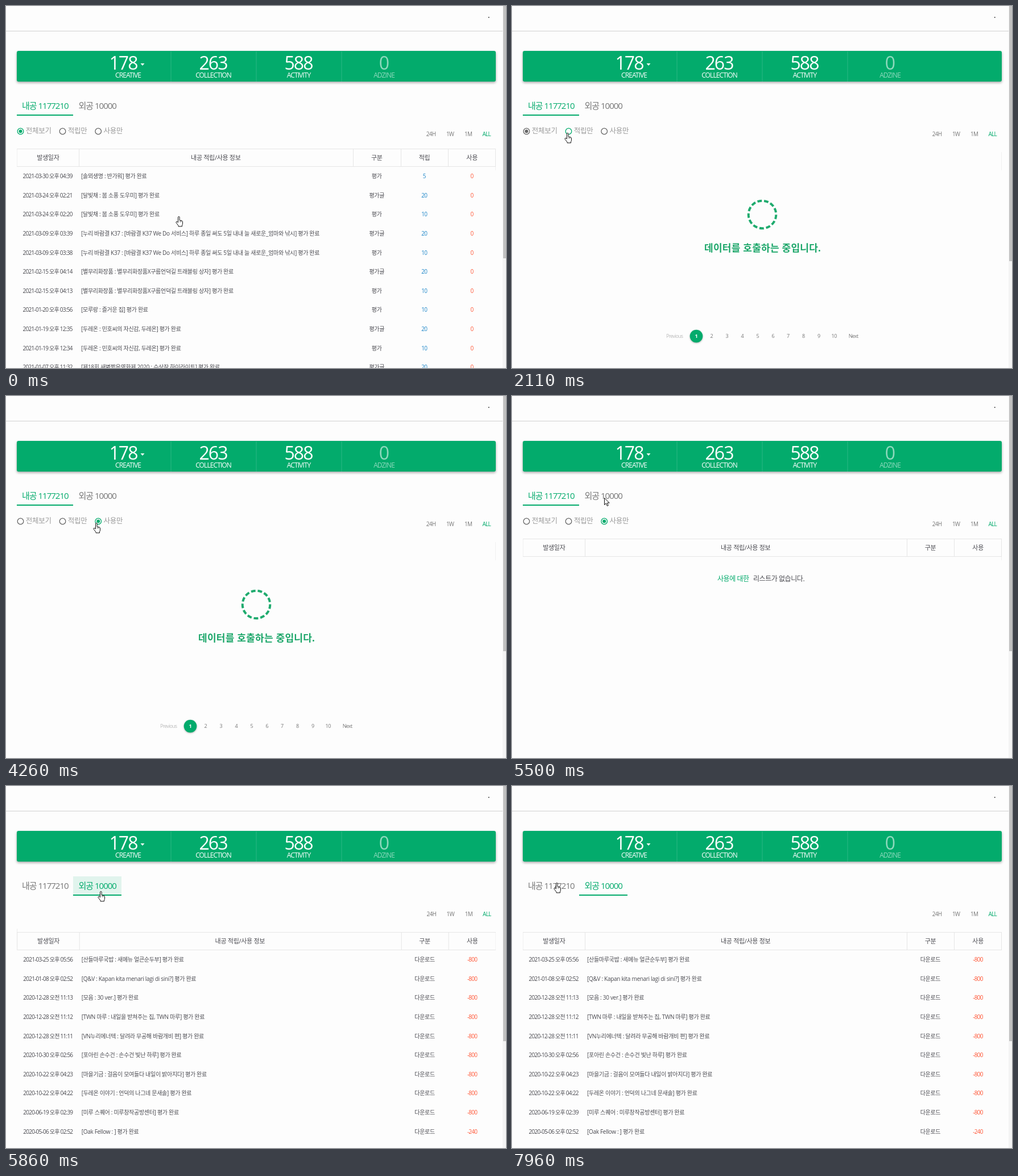
An HTML page with a canvas for the animation above (8000 ms loop, 879 by 637 pixels).

```html
<!DOCTYPE html>
<html lang="ko">
<head>
<meta charset="utf-8">
<style>
html, body { margin: 0; width: 100%; height: 100%; overflow: hidden; background: #fdfdfd; }
canvas { display: block; }
</style>
</head>
<body>
<canvas id="stage" width="879" height="637"></canvas>
<script>
const g = document.getElementById('stage').getContext('2d');
const LOOP = 8000, GREEN = '#03ab6c', GRAY = '#777', INK = '#4a4a50', BLUE = '#1d86c8', RED = '#ff5636';
const FONT = '"Open Sans", "Noto Sans CJK KR", "Noto Sans CJK", sans-serif';
const FIRST_CLICK = 2110, FIRST_LOADED = 2400, SECOND_CLICK = 3770, SECOND_LOADED = 4450;
const SLIDE_START = 5540, SLIDE_TIME = 333, PANEL = 842;

const earned = [
  ['2021-03-30 오후 04:39', '솔뫼생명 : 반가워'],
  ['2021-03-24 오후 02:21', '달빛채 : 봄 소풍 도우미'],
  ['2021-03-24 오후 02:20', '달빛채 : 봄 소풍 도우미'],
  ['2021-03-09 오후 03:39', '누리 바람결 K37 : [바람결 K37 We Do 서비스] 하루 종일 써도 5일 내내 늘 새로운_엄마와 낚시'],
  ['2021-03-09 오후 03:38', '누리 바람결 K37 : [바람결 K37 We Do 서비스] 하루 종일 써도 5일 내내 늘 새로운_엄마와 낚시'],
  ['2021-02-15 오후 04:14', '별무리화장품 : 별무리화장품X구름언덕길 트래블링 상자'],
  ['2021-02-15 오후 04:13', '별무리화장품 : 별무리화장품X구름언덕길 트래블링 상자'],
  ['2021-01-20 오후 03:56', '모루랑 : 즐거운 집'],
  ['2021-01-19 오후 12:35', '두레온 : 민호씨의 자신감, 두레온'],
  ['2021-01-19 오후 12:34', '두레온 : 민호씨의 자신감, 두레온'],
  ['2021-01-07 오후 11:32', '제18회 새벽짧은영화제 2020 : 수상작 하이라이트']
].map(([date, info], i) => {
  const essay = [1, 3, 5, 8, 10].includes(i);
  return { date, info, kind: essay ? '평가글' : '평가', gain: i ? (essay ? '20' : '10') : '5', loss: '0' };
});
const spent = [
  ['2021-03-25 오후 05:56', '산들마루국밥 : 새메뉴 얼큰순두부'],
  ['2021-01-08 오후 02:52', 'Q&V : Kapan kita menari lagi di sini?'],
  ['2020-12-28 오전 11:13', '모음 : 30 ver.'],
  ['2020-12-28 오전 11:12', 'TWN 마루 : 내일을 받쳐주는 집, TWN 마루'],
  ['2020-12-28 오전 11:11', 'VN누리에너텍 : 달려라 무공해 바람개비 편'],
  ['2020-10-30 오후 02:56', '포아린 손수건 : 손수건 빛난 하루'],
  ['2020-10-22 오후 04:23', '마을기금 : 걸음이 모여들다 내일이 밝아지다'],
  ['2020-10-22 오후 04:22', '두레온 이야기 : 언덕의 나그네 문새솔'],
  ['2020-06-19 오후 02:39', '미루 스퀘어 : 미루창작공방센터'],
  ['2020-05-06 오후 02:52', 'Oak Fellow : ']
].map(([date, info], i) => ({ date, info, kind: '다운로드', loss: i < 9 ? '-800' : '-240' }));

const HEADS = { kind: '구분', gain: '적립', loss: '사용' };
const COLORS = { kind: INK, gain: BLUE, loss: RED };

// time, left, top, pointing hand or arrow
const cursorKeys = [
  [0, 298, 370, 1], [30, 298, 369, 1], [230, 298, 368, 1], [460, 298, 368, 1], [940, 178, 282, 0],
  [1220, 107, 231, 0], [1280, 107, 231, 0], [1400, 97, 226, 1], [1460, 92, 223, 1], [2110, 92, 223, 1],
  [2420, 96, 223, 1], [2840, 96, 223, 1], [3380, 153, 223, 1], [4610, 153, 223, 1], [4700, 155, 213, 0],
  [5010, 162, 179, 0], [5530, 162, 179, 0], [5600, 161, 185, 1], [6690, 161, 185, 1], [6720, 150, 187, 1],
  [6950, 76, 182, 1], [7320, 76, 182, 1], [7400, 125, 193, 0], [7640, 271, 211, 0], [7880, 122, 181, 1],
  [7960, 73, 170, 1], [LOOP, 73, 170, 1]
];
const hand = new Path2D('M4.5 10.5V1.8a1.3 1.3 0 0 1 2.6 0V7l4 .9q1.4.4 1.4 2v3q0 1.5-1 3v2H5v-1.5l-3.8-5q-.8-1.6.6-2 1-.2 2.7 1.6z');
const arrow = new Path2D('M.5.5v12l2.8-2.7 2 4.7 2-.9-2-4.5h3.9z');

const clamp = v => Math.max(0, Math.min(1, v));

function ease(p) {
  let lo = 0, hi = 1, s;
  for (let i = 0; i < 20; i++) {
    s = (lo + hi) / 2;
    const x = 1.05 * (1 - s) ** 2 * s + 0.75 * (1 - s) * s * s + s ** 3;
    if (x < p) lo = s; else hi = s;
  }
  return 3 * (1 - s) * s * s + s ** 3;
}

function text(str, x, y, size, color, spacing = 0, align = 'center', weight = 400) {
  g.font = `${weight} ${size}px ${FONT}`;
  g.letterSpacing = spacing + 'px';
  g.textAlign = align;
  g.fillStyle = color;
  g.fillText(str, align === 'center' ? x + spacing / 2 : x, Math.round(y + size * 0.36));
}

function box(x, y, w, h, color) {
  g.fillStyle = color;
  g.fillRect(x, y, w, h);
}

function disc(x, y, r, color) {
  g.fillStyle = color;
  g.beginPath();
  g.arc(x, y, r, 0, 7);
  g.fill();
}

function drawBanner() {
  box(0, 43.5, 873, 1.5, '#dedede');
  box(848, 19, 1.5, 2, '#444');
  g.save();
  g.shadowColor = 'rgba(0,0,0,.35)';
  g.shadowBlur = 4;
  g.shadowOffsetY = 2;
  g.fillStyle = GREEN;
  g.beginPath();
  g.roundRect(19, 79, 842, 54, 3);
  g.fill();
  g.restore();
  [['178', 'CREATIVE'], ['263', 'COLLECTION'], ['588', 'ACTIVITY'], ['0', 'ADZINE']].forEach(([n, label], i) => {
    const x = 215 + 150 * i, color = i < 3 ? '#fff' : 'rgba(255,255,255,.55)';
    text(n, i ? x : 207, 100, 32, color, -2);
    text(label, x, 121.5, 12, color, -0.9);
    if (i) box(139.5 + 150 * i, 80, 1, 53, 'rgba(255,255,255,.17)');
  });
  g.fillStyle = '#fff';
  g.beginPath();
  g.moveTo(236.5, 101);
  g.lineTo(243.5, 101);
  g.lineTo(240, 105);
  g.fill();
}

function drawTabs(t, p) {
  const second = t >= SLIDE_START;
  if (second && t < 6030) {
    g.save();
    g.beginPath();
    g.rect(118, 159, 85, 33);
    g.clip();
    g.globalAlpha = 0.15 * clamp((6030 - t) / 230);
    disc(168, 186, 0.3 * (t - SLIDE_START), GREEN);
    g.restore();
  }
  text('내공 1177210', 28, 176, 15, second ? GRAY : GREEN, -1, 'left');
  text('외공 10000', 127.5, 176, 15, second ? GREEN : GRAY, -1, 'left');
  box(19 + 99 * p, 191, 99 - 14 * p, 2, GREEN);
}

function drawFilters() {
  [['24H', 747.5], ['1W', 781], ['1M', 813], ['ALL', 845]].forEach(([label, x]) =>
    text(label, x, 225, 10, label === 'ALL' ? GREEN : GRAY, -0.75));
}

function drawRadios(t) {
  const chosen = t < FIRST_CLICK ? 0 : t < SECOND_CLICK ? 1 : 2;
  const grow = chosen ? clamp((t - (chosen === 1 ? FIRST_CLICK : SECOND_CLICK)) / 280) : 1;
  [['전체보기', 25.5], ['적립만', 99.5], ['사용만', 162.2]].forEach(([label, x], i) => {
    const color = i === chosen ? GREEN : '#666';
    const dot = i === chosen ? grow : i === chosen - 1 ? 1 - grow : 0;
    g.strokeStyle = color;
    g.lineWidth = 1.3;
    g.beginPath();
    g.arc(x, 220.5, 5.3, 0, 7);
    g.stroke();
    if (dot) disc(x, 220.5, 3 * dot, color);
    text(label, x + 9.3, 219.5, 12.5, '#999', -0.3, 'left');
  });
}

function drawTable(top, cols, rows) {
  const left = 861 - 83.7 * cols.length;
  g.strokeStyle = '#e6e6e6';
  g.lineWidth = 1;
  g.strokeRect(19, top + 0.5, 841.5, 31);
  [128, ...cols.map((_, i) => Math.round(left + 83.7 * i))].forEach(x => box(x, top, 1, 31, '#e6e6e6'));
  text('발생일자', 74, top + 16, 11, INK, -0.3);
  text('내공 적립/사용 정보', (128 + left) / 2, top + 16, 11, INK, -0.3);
  cols.forEach((c, i) => text(HEADS[c], left + 83.7 * i + 42, top + 16, 11, INK, -0.3));
  rows.forEach((row, n) => {
    const y = top + 48.3 + 33.65 * n;
    text(row.date, 73.5, y, 10, INK, -0.75);
    text(`[${row.info}] 평가 완료`, 132, y, 10, INK, -0.3, 'left');
    cols.forEach((c, i) => text(row[c], left + 83.7 * i + 42, y, 10, COLORS[c], c === 'kind' ? -0.3 : -0.75));
  });
}

function drawLoader(t) {
  const arc = 2 * Math.PI / 13;
  g.strokeStyle = '#1fab6e';
  g.lineWidth = 4;
  for (let i = 0; i < 13; i++) {
    const a = i * arc + (t - FIRST_CLICK) / 1000 * 2 * Math.PI;
    g.beginPath();
    g.arc(440, 367, 24.3, a, a + arc * 0.67);
    g.stroke();
  }
  text('데이터를 호출하는 중입니다.', 440.5, 425.5, 17, '#1ba669', 0.25, 'center', 700);
  text('Previous', 286, 581, 9, '#bbb', -0.85);
  g.save();
  g.shadowColor = 'rgba(0,0,0,.3)';
  g.shadowBlur = 3;
  g.shadowOffsetY = 1;
  disc(324, 581, 11.3, GREEN);
  g.restore();
  text('1', 324, 581, 9, '#fff', 0, 'center', 700);
  for (let n = 2; n <= 10; n++) text(String(n), 297 + 27 * n - (n > 6 ? 0.5 : 0), 581, 9, GRAY, -0.5);
  text('Next', 600.5, 581, 9, GRAY, -0.7);
}

function drawFirstPanel(t) {
  drawRadios(t);
  drawFilters();
  if (t < FIRST_CLICK) drawTable(251, ['kind', 'gain', 'loss'], earned);
  else if (isLoading(t)) drawLoader(t);
  else if (t < SECOND_CLICK) drawTable(251, ['kind', 'gain'], earned);
  else {
    drawTable(251, ['kind', 'loss'], []);
    text('사용에 대한', 361, 321.5, 12, GREEN, -0.45, 'left');
    text('리스트가 없습니다.', 424, 321.5, 12, INK, -0.45, 'left');
  }
}

function drawSecondPanel() {
  drawFilters();
  drawTable(257, ['kind', 'loss'], spent);
}

function isLoading(t) {
  return t >= FIRST_CLICK && t < FIRST_LOADED || t >= SECOND_CLICK && t < SECOND_LOADED;
}

function drawCursor(t) {
  const i = cursorKeys.findIndex(k => k[0] > t);
  const [t0, x0, y0, pointing] = cursorKeys[i - 1], [t1, x1, y1] = cursorKeys[i];
  const p = (t - t0) / (t1 - t0), shape = pointing ? hand : arrow;
  g.save();
  g.translate(Math.round(x0 + (x1 - x0) * p), Math.round(y0 + (y1 - y0) * p));
  g.fillStyle = '#fff';
  g.fill(shape);
  g.strokeStyle = '#111';
  g.lineWidth = 1;
  g.stroke(shape);
  if (pointing) [7.5, 9.5].forEach(x => box(x, 8, 0.7, 2.5, '#333'));
  g.restore();
}

function draw(t) {
  const p = ease(clamp((t - SLIDE_START) / SLIDE_TIME));
  box(0, 0, 879, 637, '#fdfdfd');
  drawBanner();
  drawTabs(t, p);
  g.save();
  g.beginPath();
  g.rect(19, 194, PANEL, 443);
  g.clip();
  g.translate(-PANEL * p, 0);
  if (p < 1) drawFirstPanel(t);
  g.translate(PANEL, 0);
  if (p > 0) drawSecondPanel();
  g.restore();
  const full = t < SECOND_CLICK && !isLoading(t);
  box(873, 0, 6, 637, '#f4f4f4');
  box(874, 0, 5, full ? 444 : 449, '#c1c1c1');
  drawCursor(t);
}

const start = performance.now();
function tick() {
  draw((performance.now() - start) % LOOP);
  requestAnimationFrame(tick);
}
tick();
</script>
</body>
</html>
```
